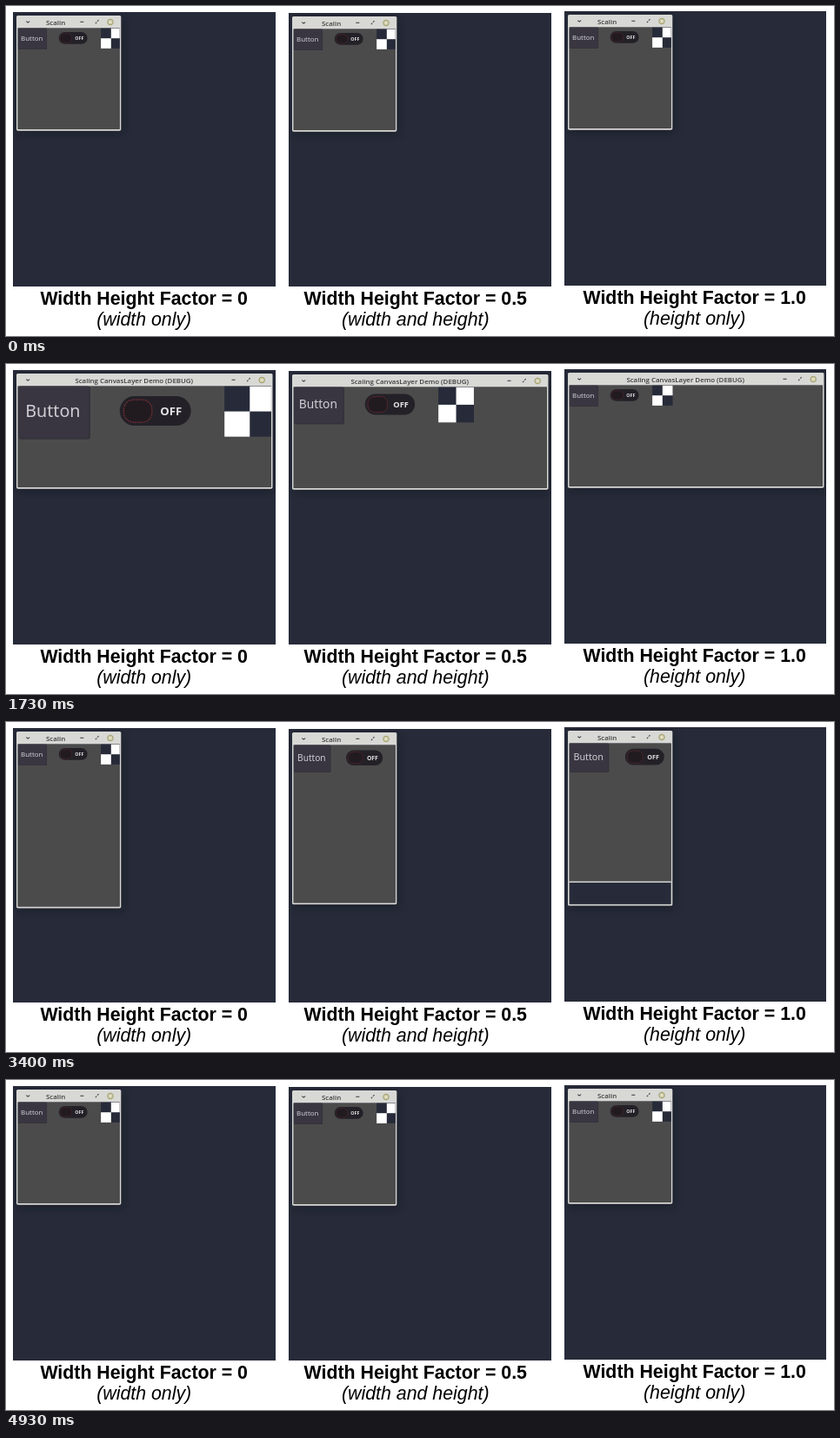
An HTML page for the animation above (4.99 s loop, 952x380 px).

```html
<!DOCTYPE html>
<html lang="en">
<head>
<meta charset="utf-8">
<title>Scaling by width and height</title>
<style>
  html, body { margin: 0; width: 100%; height: 100%; overflow: hidden; background: #fff; }
  #stage { display: block; width: 952px; height: 380px; }
  .caption { font: 21.33px "Liberation Sans", Arial, sans-serif; text-anchor: middle; fill: #000; }
  .bold { font-weight: 700; }
  .italic { font-style: italic; }
  .title { font: 600 7.9px "Open Sans", "Noto Sans", sans-serif; fill: #3d3d3d; }
  .button { font: 7.9px "Noto Sans", sans-serif; text-anchor: middle; fill: #cfced2; }
  .off { font: 600 5.3px "Noto Sans", sans-serif; text-anchor: middle; fill: #e4e3e6; }
</style>
</head>
<body>
<svg id="stage" viewBox="0 0 952 380">
  <defs>
    <filter id="blur" x="-20%" y="-20%" width="140%" height="140%"><feGaussianBlur stdDeviation="4"/></filter>
  </defs>
</svg>
<script>
const LOOP = 4990, STEP = 1000 / 15;
const TITLE = "Scaling CanvasLayer Demo (DEBUG)";
const SMALL_W = 120.3, SMALL_H = 132.5, BIG_W = 294.5, BIG_H = 306.7;
const BAR = 14.5, EDGE = 1.6;
const NAVY = "#272b39", FRAME = "#d8d8d5", INK = "#444";
const stage = document.getElementById("stage");

function add(parent, tag, attrs, text) {
  const node = document.createElementNS("http://www.w3.org/2000/svg", tag);
  set(node, attrs);
  if (text) node.textContent = text;
  parent.appendChild(node);
  return node;
}

function set(node, attrs) {
  for (const key in attrs) node.setAttribute(key, attrs[key]);
}

function rect(parent, x, y, width, height, fill, more) {
  return add(parent, "rect", { x, y, width, height, fill, ...more });
}

// Linear interpolation through [time, value] pairs
function track(keys, t) {
  const i = keys.findIndex(k => k[0] > t);
  if (i === 0) return keys[0][1];
  if (i < 0) return keys[keys.length - 1][1];
  const [t0, v0] = keys[i - 1], [t1, v1] = keys[i];
  return v0 + (v1 - v0) * (t - t0) / (t1 - t0);
}

const widthKeys = (early, mid) => [
  [80, SMALL_W], [530, early], [1000, mid], [1480, BIG_W], [2230, BIG_W], [2640, SMALL_W]
];
const heightKeys = (rise, shrink) => [
  [3270, SMALL_H], ...rise, [shrink, BIG_H], [shrink + 265, SMALL_H]
];

function drawWidgets(parent) {
  rect(parent, 0.3, 0, 33.2, 24.6, "#2f2d38", { rx: 1.2, opacity: 0.8 });
  rect(parent, 0.3, 0, 32.4, 23.8, "#393642", { rx: 1 });
  add(parent, "text", { class: "button", x: 16.2, y: 14.1 }, "Button");

  rect(parent, 47.1, 4.6, 32.9, 13.7, "#232127", { rx: 6.8 });
  rect(parent, 49, 6.3, 13, 10.4, "#211b20", {
    rx: 4.6, stroke: "#8a3038", "stroke-width": 0.5, "stroke-dasharray": "0.6 0.5"
  });
  add(parent, "text", { class: "off", x: 70.8, y: 13.4 }, "OFF");

  const x = 95.5, half = 11.7;
  rect(parent, x, 0, 2 * half, 2 * half, NAVY);
  rect(parent, x + half, 0, half, half, "#fff");
  rect(parent, x, half, half, half, "#fff");
}

function drawControls(parent) {
  const line = { fill: "none", stroke: INK, "stroke-width": 1.1 };
  add(parent, "path", { ...line, d: "M-47 11.3h4" });
  add(parent, "path", { ...line, d: "M-29.5 13.2l1.5-1.5M-27.3 10.6l1.5-1.5" });
  add(parent, "circle", { cx: -12.3, cy: 11.5, r: 3.3, fill: "#c9c7a2", stroke: "#a3a06c", "stroke-width": 1 });
  add(parent, "path", { d: "M-13.7 10.1l2.8 2.8m0-2.8l-2.8 2.8", stroke: "#f4f3e4", "stroke-width": 1 });
}

function makePanel({ x, y, width, height, center, base, factor, label, note, widths, heights, lag }) {
  const panel = add(stage, "svg", { x, y, width, height });
  rect(panel, 0, 0, width, height, NAVY);
  const shadow = rect(panel, 6, 7, 0, 0, "#10121a", { opacity: 0.5, filter: "url(#blur)" });
  const frame = rect(panel, 4, 4, 0, 0, FRAME, { rx: 1.5 });
  const gap = rect(panel, 4 + EDGE, 4 + BAR, 0, 0, NAVY);
  const divider = rect(panel, 4 + EDGE, 0, 0, EDGE, FRAME);
  const view = add(panel, "svg", { x: 4 + EDGE, y: 4 + BAR });
  rect(view, 0, 0, "100%", "100%", "#4b4b4b");
  const widgets = add(view, "g", {});
  drawWidgets(widgets);

  add(panel, "path", { d: "M15.2 10.6l2 1.4 2-1.4", fill: "none", stroke: INK, "stroke-width": 1.1 });
  const title = add(panel, "text", { class: "title", y: 14.5 }, TITLE);
  const controls = add(panel, "g", {});
  drawControls(controls);

  add(stage, "text", { class: "caption bold", x: center, y: base }, "Width Height Factor = " + label);
  add(stage, "text", { class: "caption italic", x: center, y: base + 24 }, `(${note})`);

  function placeTitle(right) {
    const left = 38, room = right - 60 - left;
    title.textContent = TITLE;
    let length = title.getComputedTextLength(), count = TITLE.length;
    while (length > room && count > 1) length = title.getSubStringLength(0, --count);
    title.textContent = TITLE.slice(0, count);
    title.setAttribute("x", count < TITLE.length ? left : left + (room - length) / 2 + 1);
  }

  return t => {
    const w = track(widths, t), h = track(heights, t);
    const innerW = w - 2 * EDGE, innerH = h - BAR - EDGE;
    const viewH = Math.min(innerH, track(heights, t - lag) - BAR - EDGE);
    const scaleX = innerW / (SMALL_W - 2 * EDGE);
    const scaleY = viewH / (SMALL_H - BAR - EDGE);
    const scale = scaleX * (1 - factor) + scaleY * factor;
    set(shadow, { width: w, height: h });
    set(frame, { width: w, height: h });
    set(gap, { width: innerW, height: innerH });
    set(divider, { width: innerW, y: 4 + BAR + viewH });
    set(view, { width: innerW, height: viewH });
    set(widgets, { transform: `scale(${scale})` });
    set(controls, { transform: `translate(${4 + w})` });
    placeTitle(4 + w);
  };
}

const panels = [
  { x: 8, y: 7, width: 302, height: 316, center: 158.7, base: 344, factor: 0, label: "0", note: "width only",
    widths: widthKeys(255, 268.8), heights: heightKeys([[3590, BIG_H]], 4535), lag: 0 },
  { x: 325, y: 8, width: 302, height: 315, center: 470.8, base: 344, factor: 0.5, label: "0.5", note: "width and height",
    widths: widthKeys(243, 250.5), heights: heightKeys([[3600, 299], [3690, BIG_H]], 4555), lag: 0 },
  { x: 642, y: 6, width: 301, height: 316, center: 791.7, base: 343, factor: 1, label: "1.0", note: "height only",
    widths: widthKeys(243, 250.2), heights: heightKeys([[3550, 281], [3600, 300], [3680, BIG_H]], 4555), lag: 50 }
].map(makePanel);

function render(ms) {
  // Motion advances at 15 steps per second
  const t = Math.floor((ms % LOOP + 4) / STEP) * STEP;
  panels.forEach(update => update(t));
}

const start = performance.now();
function tick() {
  render(performance.now() - start);
  requestAnimationFrame(tick);
}
tick();
</script>
</body>
</html>
```
